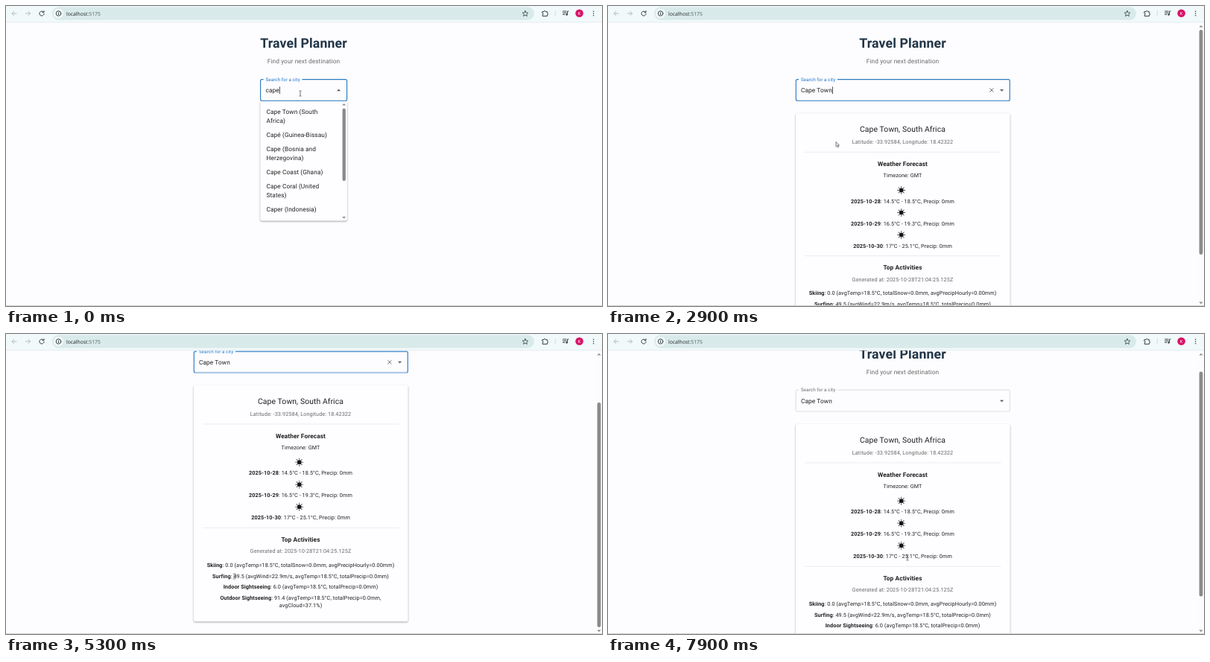
Animation, 800 px wide and 403 px high, one loop 8 s. Source, as an HTML page:

```html
<!DOCTYPE html>
<html lang="en">
<head>
<meta charset="utf-8">
<title>Travel Planner</title>
<style>
  @property --scroll { syntax: "<number>"; inherits: true; initial-value: 0; }

  html, body { margin: 0; width: 100%; height: 100%; overflow: hidden; background: #fdfcfe; }
  svg.stage {
    display: block; width: 100vw; height: 100vh;
    font: 8.33px Roboto, sans-serif; letter-spacing: .0094em;
    text-rendering: geometricPrecision;
    animation: scroll 8s step-end -10ms infinite;
  }

  /* Type */
  text { fill: #212121; }
  .mid text { text-anchor: middle; }
  .title { font-size: 17.7px; font-weight: 700; letter-spacing: .0073em; fill: #213547; }
  .city { font-size: 10.42px; letter-spacing: .0075em; }
  .head, b, .b { font-weight: 700; }
  .small { font-size: 7.29px; letter-spacing: .0107em; }
  .label { font-size: 6.25px; }
  text.muted { fill: #6a6a6a; }
  text.blue { fill: #1976d2; }
  .url { font: 6.8px "Open Sans", "Noto Sans", sans-serif; letter-spacing: 0; }

  /* Shapes */
  .page { fill: #fdfcfe; }
  .outline { fill: none; stroke: #c6c5c7; stroke-width: .6; }
  .focus { fill: none; stroke: #2a7cc4; stroke-width: 1.15; }
  .rule { stroke: #dfdee0; stroke-width: .6; }
  .paper { fill: #fefdff; filter: drop-shadow(0 1px 1.2px rgba(0, 0, 0, .36)); }
  .bar { fill: #8b8b8b; }
  .icon { fill: none; stroke: #33403f; stroke-width: 1; stroke-linecap: round; stroke-linejoin: round; }
  .icon.off { stroke: #b3bcbd; }
  .glyph { fill: #5f5f5f; }

  /* Motion */
  .doc { transform: translateY(calc(var(--scroll) * -1px)); }
  .thumb { transform: translateY(calc(var(--scroll) * .797px)); }
  .search, .result, .active, .idle, .hint, .beam, .arrow { animation: 8s step-end -10ms infinite; }
  .search { animation-name: search; }
  .result { animation-name: result; }
  .active { animation-name: active; }
  .idle { animation-name: idle; }
  .hint { animation-name: hint; }
  .beam { animation-name: beam; }
  .arrow { animation-name: arrow; }
  .caret { fill: #222; animation: blink 1s step-end -10ms infinite; }
  .cursor { animation: move 8s -10ms infinite; }

  @keyframes scroll {
    0% { --scroll: 0; }
    37.5% { --scroll: 45; }
    38.75% { --scroll: 75.3; }
    97.5% { --scroll: 60; }
    98.75%, 100% { --scroll: 23.3; }
  }
  @keyframes search { 0% { opacity: 1; } 20%, 100% { opacity: 0; } }
  @keyframes result { 0% { opacity: 0; } 20%, 100% { opacity: 1; } }
  @keyframes active { 0% { opacity: 1; } 75%, 100% { opacity: 0; } }
  @keyframes idle { 0% { opacity: 0; } 75%, 100% { opacity: 1; } }
  @keyframes hint { 0% { opacity: 0; } 8.75%, 100% { opacity: .04; } }
  @keyframes blink { 0% { opacity: 1; } 20% { opacity: 0; } 70%, 100% { opacity: 1; } }
  @keyframes beam { 0% { opacity: 1; } 27.5% { opacity: 0; } 38.75%, 100% { opacity: 1; } }
  @keyframes arrow { 0% { opacity: 0; } 27.5% { opacity: 1; } 38.75%, 100% { opacity: 0; } }
  @keyframes move {
    0% { transform: translate(395px, 117.5px); animation-timing-function: step-end; }
    25% { transform: translate(395px, 117.5px); animation-timing-function: steps(8); }
    35% { transform: translate(306px, 182.5px); animation-timing-function: step-end; }
    36.25% { transform: translate(306px, 182.5px); animation-timing-function: steps(2); }
    38.75% { transform: translate(344.5px, 246px); animation-timing-function: steps(6); }
    46.25% { transform: translate(297px, 311px); animation-timing-function: steps(9); }
    57.5% { transform: translate(322px, 311px); animation-timing-function: steps(7); }
    66.25% { transform: translate(306.5px, 325.5px); animation-timing-function: steps(11); }
    80% { transform: translate(360px, 327px); animation-timing-function: steps(2); }
    82.5% { transform: translate(362px, 340px); animation-timing-function: steps(7); }
    91.25% { transform: translate(364px, 355px); animation-timing-function: steps(6); }
    98.75%, 100% { transform: translate(402px, 300.5px); }
  }
</style>
</head>
<body>
<svg class="stage" viewBox="0 0 800 403" preserveAspectRatio="none">
  <defs>
    <g id="sun" fill="#161616">
      <circle r="2.95"/>
      <path id="ray" d="M-.65-3.7H.65L0-5.9Z"/>
      <use href="#ray" transform="rotate(45)"/>
      <use href="#ray" transform="rotate(90)"/>
      <use href="#ray" transform="rotate(135)"/>
      <use href="#ray" transform="rotate(180)"/>
      <use href="#ray" transform="rotate(225)"/>
      <use href="#ray" transform="rotate(270)"/>
      <use href="#ray" transform="rotate(315)"/>
    </g>
    <path id="down" d="M-2.6-1.3H2.6L0 1.4Z"/>
    <path id="up" d="M-2.6 1.3H2.6L0-1.4Z"/>
  </defs>

  <rect class="page" width="800" height="403"/>

  <!-- Suggestions -->
  <g class="search">
    <g class="mid">
      <text class="title" x="399.5" y="56">Travel Planner</text>
      <text class="muted" x="399.5" y="77">Find your next destination</text>
    </g>
    <rect class="focus" x="341.6" y="98.6" width="116" height="28.6" rx="2"/>
    <rect class="page" x="345.5" y="97" width="52" height="3"/>
    <text class="label blue" x="348.5" y="100.6">Search for a city</text>
    <text x="348.5" y="116">cape</text>
    <rect class="caret" x="366.9" y="108.4" width=".8" height="9.6"/>
    <use class="glyph" href="#up" x="446.6" y="113"/>

    <rect class="paper" x="341.4" y="128" width="116.5" height="160.4" rx="2"/>
    <rect class="hint" x="341.4" y="132.5" width="107.6" height="31.2"/>
    <text x="349.5" y="144.8">Cape Town (South</text>
    <text x="349.5" y="157.2">Africa)</text>
    <text x="349.5" y="175.8">Capé (Guinea-Bissau)</text>
    <text x="349.5" y="194.5">Cape (Bosnia and</text>
    <text x="349.5" y="207">Herzegovina)</text>
    <text x="349.5" y="225.8">Cape Coast (Ghana)</text>
    <text x="349.5" y="244.5">Cape Coral (United</text>
    <text x="349.5" y="257">States)</text>
    <text x="349.5" y="275.8">Caper (Indonesia)</text>
    <use class="bar" href="#up" x="453.7" y="132.3"/>
    <rect class="bar" x="451.6" y="137.5" width="4.3" height="97.5" rx="2.1"/>
    <use class="bar" href="#down" x="453.7" y="284.2"/>
  </g>

  <!-- Forecast -->
  <g class="result">
    <g class="doc">
      <g class="mid">
        <text class="title" x="395.5" y="56">Travel Planner</text>
        <text class="muted" x="395.5" y="77">Find your next destination</text>
      </g>
      <g class="active">
        <rect class="focus" x="252.3" y="98.6" width="287" height="28.6" rx="2"/>
        <rect class="page" x="256" y="97" width="52" height="3"/>
        <text class="label blue" x="259" y="100.6">Search for a city</text>
        <rect class="caret" x="301.1" y="108.4" width=".8" height="9.6"/>
        <path d="M512.3 110.5l5.2 5.2m0-5.2l-5.2 5.2" stroke="#5f5f5f" stroke-width=".9"/>
      </g>
      <g class="idle">
        <rect class="outline" x="252.1" y="98.4" width="287.4" height="29" rx="2"/>
        <rect class="page" x="256" y="97" width="52" height="3"/>
        <text class="label muted" x="259" y="100.6">Search for a city</text>
      </g>
      <text x="259" y="116">Cape Town</text>
      <use class="glyph" href="#down" x="528.6" y="113.3"/>

      <rect class="paper" x="252" y="144.3" width="287.6" height="317.2" rx="2"/>
      <path class="rule" d="M264.3 196.3H527.5M264.3 335.6H527.5"/>
      <use href="#sun" x="393.7" y="247.5"/>
      <use href="#sun" x="393.7" y="277.5"/>
      <use href="#sun" x="393.7" y="307.5"/>
      <g class="mid">
        <text class="city" x="395.5" y="169.1">Cape Town, South Africa</text>
        <text class="head" x="395.5" y="215">Weather Forecast</text>
        <text class="head" x="395.5" y="354.4">Top Activities</text>
        <g class="small">
          <text class="muted" x="395.5" y="185.2">Latitude: -33.92584, Longitude: 18.42322</text>
          <text x="395.5" y="230.2">Timezone: GMT</text>
          <text x="395.5" y="264.6"><tspan class="b">2025-10-28</tspan>: 14.5°C - 18.5°C, Precip: 0mm</text>
          <text x="395.5" y="294.6"><tspan class="b">2025-10-29</tspan>: 16.5°C - 19.3°C, Precip: 0mm</text>
          <text x="395.5" y="324.6"><tspan class="b">2025-10-30</tspan>: 17°C - 25.1°C, Precip: 0mm</text>
          <text class="muted" x="395.5" y="369.7">Generated at: 2025-10-28T21:04:25.125Z</text>
          <text x="395.5" y="388.2"><tspan class="b">Skiing</tspan>: 0.0 (avgTemp=18.5°C, totalSnow=0.0mm, avgPrecipHourly=0.00mm)</text>
          <text x="395.5" y="402.9"><tspan class="b">Surfing</tspan>: 49.5 (avgWind=22.9m/s, avgTemp=18.5°C, totalPrecip=0.0mm)</text>
          <text x="395.5" y="417.5"><tspan class="b">Indoor Sightseeing</tspan>: 6.0 (avgTemp=18.5°C, totalPrecip=0.0mm)</text>
          <text x="395.5" y="432.1"><tspan class="b">Outdoor Sightseeing</tspan>: 91.4 (avgTemp=18.5°C, totalPrecip=0.0mm,</text>
          <text x="395.5" y="442.5">avgCloud=37.1%)</text>
        </g>
      </g>
    </g>
    <rect x="792" y="22" width="8" height="381" fill="#fcfbfd"/>
    <use class="bar" href="#up" x="796" y="27.3"/>
    <rect class="bar thumb" x="793.6" y="32" width="4.8" height="302" rx="2.4"/>
    <use class="bar" href="#down" x="796" y="398.8"/>
  </g>

  <rect y="402" width="800" height="1" fill="#d2d2d4"/>

  <!-- Browser toolbar -->
  <rect width="800" height="22" fill="#f1f9fa"/>
  <rect y="21.6" width="800" height=".6" fill="#dde5e7"/>
  <rect x="62" y="1.3" width="647" height="17.4" rx="8.7" fill="#d9eaea"/>
  <path class="icon off" d="M14 10H8m2.7-2.7L8 10l2.7 2.7M26.5 10h6m-2.7-2.7l2.7 2.7-2.7 2.7"/>
  <path class="icon" d="M50.4 8.1a3.1 3.1 0 1 0 .7 2.3M51 6.6v2.1h-2.1"/>
  <circle cx="70.5" cy="10" r="6.6" fill="#f1f9fa"/>
  <circle class="icon" cx="70.5" cy="10" r="3.3" stroke-width=".8"/>
  <path class="icon" d="M70.5 9.9v1.7M70.5 8.3v.1" stroke-width=".8"/>
  <text class="url" x="81" y="12.5">localhost<tspan fill="#4d5d5d">:5175</tspan></text>
  <path class="icon" d="M697 6.4l1.1 2.5 2.7.2-2 1.8.6 2.7-2.4-1.4-2.4 1.4.6-2.7-2-1.8 2.7-.2Z" style="stroke-width:.8"/>
  <path class="icon" d="M720.2 7.6h2a1.1 1.1 0 0 1 2.2 0h2v2.1a1.1 1.1 0 0 1 0 2.2v1.7h-6.2v-1.9a1 1 0 0 0 0-2Z"/>
  <path d="M737.3 6v8" stroke="#c3d6d7" stroke-width=".7"/>
  <path class="icon" d="M747.6 7h4.4M747.6 9.2h4.4M747.6 11.4h2.3M753.6 11.2V7h1.4"/>
  <circle cx="752.7" cy="11.5" r="1.3" fill="#33403f"/>
  <circle cx="769.6" cy="9.7" r="5.3" fill="#d81467"/>
  <text x="769.6" y="11.8" text-anchor="middle" style="font-size:5.6px;fill:#fff">K</text>
  <g fill="#33403f">
    <circle cx="788.6" cy="7.2" r=".8"/>
    <circle cx="788.6" cy="10" r=".8"/>
    <circle cx="788.6" cy="12.8" r=".8"/>
  </g>

  <!-- Pointer -->
  <g class="cursor">
    <path class="beam" d="M-1.6-3.4H-.4L0-3 .4-3.4H1.6M0-3V3M-1.6 3.4H-.4L0 3 .4 3.4H1.6" fill="none" stroke="#3a3a3a" stroke-width=".7"/>
    <path class="arrow" d="M0 0V6.4L1.5 5.1 2.5 7.3 3.5 6.9 2.5 4.7H4.5Z" fill="#fff" stroke="#333" stroke-width=".65"/>
  </g>
</svg>
</body>
</html>
```
